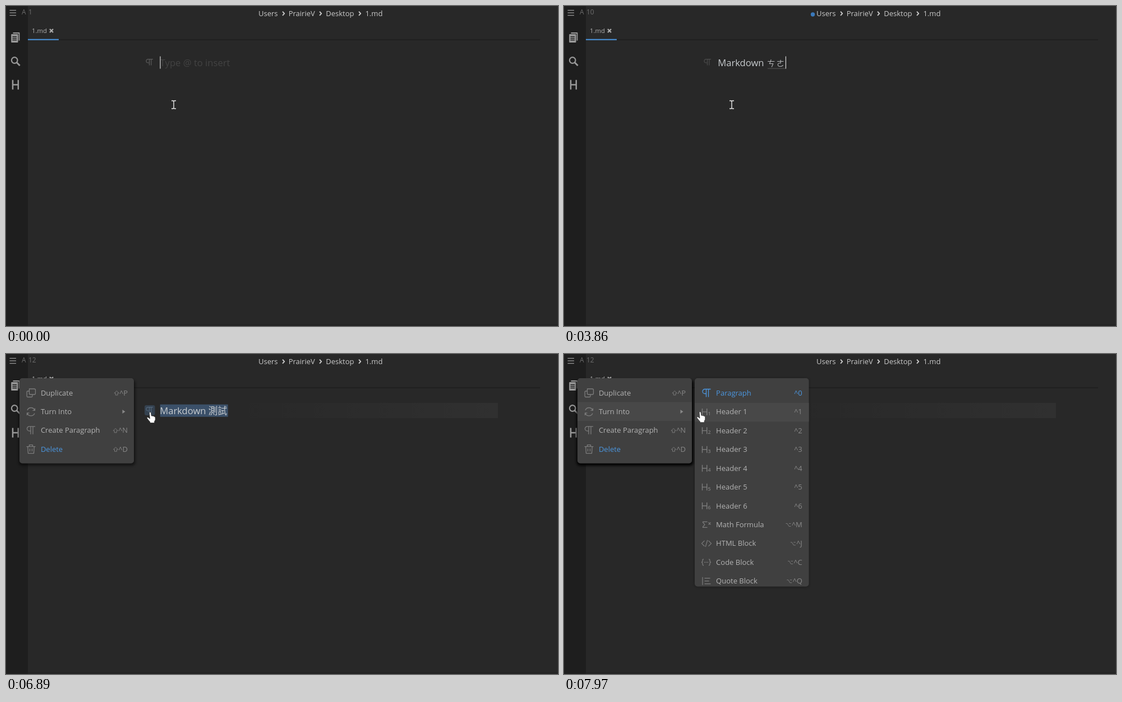
An HTML page that plays this animation: 984x569 px, repeating every 8 s.

```html
<!DOCTYPE html>
<html lang="zh-Hant">
<head>
<meta charset="utf-8">
<style>
html, body { margin: 0; width: 100%; height: 100%; overflow: hidden; background: #282828; }
svg { display: block; width: 984px; height: 569px; }
text { font-family: "Open Sans", "Noto Sans CJK TC", "Noto Sans CJK", sans-serif; font-size: 13px; white-space: pre; }
.line { fill: none; stroke-linecap: butt; stroke-linejoin: round; }
#body { font-size: 16.600px; }
#phonetic { font-size: 14px; letter-spacing: 2.500px; }
</style>
</head>
<body>
<svg viewBox="0 0 984 569" xmlns="http://www.w3.org/2000/svg">
  <defs>
    <linearGradient id="fade">
      <stop offset=".25" stop-color="#fff" stop-opacity="0"/>
      <stop offset="1" stop-color="#fff" stop-opacity=".038"/>
    </linearGradient>
    <clipPath id="subClip"><rect x="233" y="43" width="203.500" height="370.500" rx="5"/></clipPath>
    <filter id="blur" x="-10%" y="-10%" width="120%" height="120%"><feGaussianBlur stdDeviation="2"/></filter>
    <g id="para" class="line" stroke-width="1.200">
      <path d="M13 .6H4.200a3.200 3.200 0 0 0 0 6.400H6.500M6.500 .6V11.500M9.800 .6V11.500"/>
    </g>
  </defs>
  <rect width="984" height="569" fill="#282828"/>
  <rect width="39" height="569" fill="#1e1e1e"/>
  <path d="M39 567.500H984" stroke="#232323" stroke-width="2"/>
  <path d="M94 60H952" stroke="#202020" stroke-width="2"/>
  <rect x="39" y="58.700" width="55" height="2" fill="#4b95de"/>
  <g class="line" stroke="#999">
    <path d="M12.500 48H23.500V61.500" stroke-width="1.800"/>
    <rect x="9.200" y="50" width="12.300" height="15" rx="1" fill="#999" stroke="none"/>
    <path d="M11.500 54.500H19M11.500 57.500H19M11.500 60.500H19" stroke="#1e1e1e" stroke-width="1.300"/>
    <path d="M6.500 7.700H18M6.500 12.200H18M6.500 16.700H18" stroke-width="1.300"/>
    <circle cx="15.200" cy="96.500" r="5.300" stroke-width="2.200"/>
    <path d="M19.200 100.500L24.700 106" stroke-width="2.800"/>
    <path d="M12 131.500V148.500M21.800 131.500V148.500M12 140H21.800" stroke-width="2.500"/>
  </g>
  <g fill="#6c6c6c"><text x="28" y="15" style="font-size:12px">A</text><text id="count" x="40" y="15" style="font-size:12px"></text></g>
  <circle id="dot" cx="443.500" cy="15" r="3.700" fill="#3a79bb"/>
  <g fill="#cacaca">
    <text x="450" y="18">Users</text><text x="503.700" y="18">PrairieV</text>
    <text x="570.300" y="18">Desktop</text><text x="640.400" y="18">1.md</text>
  </g>
  <path id="chevrons" class="line" stroke="#cacaca" stroke-width="1.900"/>
  <text x="46" y="48" fill="#acacac" style="font-size:11.300px">1.md</text>
  <path d="M78 41L84 47M84 41L78 47" stroke="#acacac" stroke-width="2.300"/>

  <rect id="row" x="247" y="87" width="630" height="27" fill="url(#fade)"/>
  <rect id="hover" x="247" y="91" width="18.500" height="18" rx="3" fill="#34414f"/>
  <use id="mark" href="#para" x="249" y="94"/>
  <rect id="select" x="274.700" y="89.700" width="121" height="22" fill="#3b5069"/>
  <text id="hint" x="274.700" y="107" fill="#434343" style="font-size:16.600px">Type @ to insert</text>
  <text id="body" x="274.200" y="107" fill="#c6cacd"><tspan id="typed"></tspan><tspan id="phonetic" dx="1.500" fill="#b4b6b8"></tspan></text>
  <rect id="under" x="363" y="110.600" height="1" fill="#565656"/>
  <rect id="caret" y="89.500" width="1.200" height="22" fill="#d8d8d8"/>

  <g id="menu">
    <rect id="shade" x="22.500" y="46" width="208" height="152.500" rx="6" fill="#000" filter="url(#blur)"/>
    <rect x="24" y="43" width="204" height="151.500" rx="5" fill="#404040"/>
    <rect id="turn" x="24" y="85.500" width="204" height="33.500" fill="#484848"/>
    <g id="menuItems"></g>
  </g>
  <g id="sub">
    <rect x="232.500" y="43.500" width="204.500" height="371" rx="6" fill="#000" opacity=".3" filter="url(#blur)"/>
    <g clip-path="url(#subClip)">
      <rect x="233" y="43" width="204" height="371" fill="#404040"/>
      <rect id="head" x="233" y="87" width="204" height="33.300" fill="#484848"/>
      <g id="subItems"></g>
    </g>
  </g>

  <g id="beam" class="line"><path d="M-4 -7H-1L0 -6L1 -7H4M-4 7H-1L0 6L1 7H4M0 -6V6" stroke="#ececec" stroke-width="1.400"/></g>
  <path id="hand" fill="#fff" stroke="#222" stroke-width=".7" stroke-linejoin="round"
    d="M-1.500 1.200C-1.500 -.5 1.300 -.5 1.500 1.200L2.300 6.800C3 5.900 4.500 6.100 4.800 7.200C5.600 6.500 7 6.900 7.200 8C8.200 7.600 9 8.200 9.100 9.400L9.200 13.500L7.600 16.500V19H-.2V17.300C-2 15.500 -3.800 13 -5.600 10.700C-6.300 9 -4.300 8.500 -3 9.600L-.6 11.500Z"/>
</svg>
<script>
const $ = id => document.getElementById(id);
const show = (id, on) => $(id).style.display = on ? "" : "none";
const label = (x, y, s, fill, more = "") => `<text x="${x}" y="${y}" fill="${fill}" ${more}>${s}</text>`;
const line = (x, y, d, color, w = 1.2) =>
  `<path class="line" transform="translate(${x} ${y})" d="${d}" stroke="${color}" stroke-width="${w}"/>`;

const BLUE = "#4b96df", TEXT = "#b2b2b2", DIM = "#888", ICON = "#7c7c7c";
const shift = "M5 -4L9 0H7V3.500H3V0H1Z";
const option = "M1 -2.500H3.500L6.500 2.500H10M6.500 -2.500H10";

$("chevrons").setAttribute("d", [493, 559, 629].map(x => `M${x} 9.800L${x + 3.2} 13.300L${x} 16.800`).join(""));

function key(right, y, s, mod, width) {
  const x = right - width - (mod === shift ? 10 : 11.5);
  return label(right, y + 4.5, s, DIM, 'text-anchor="end"') + (mod ? line(x, y + .5, mod, "#808080", .9) : "");
}

const menuIcons = [
  "M5 -7H14Q16 -7 16 -5V1Q16 3 14 3H7Q5 3 5 1ZM5 -3H2Q.7 -3 .7 -1.500V6Q.7 7.500 2 7.500H9Q10.500 7.500 10.500 6V3",
  "M1.500 -2.500A7 7 0 0 1 14.500 -2.500M14.500 3A7 7 0 0 1 1.500 3M15 -6V-2H11M1 6.500V2.500H5",
  "M15.500 -7H5a4 4 0 0 0 0 8H7.500M7.500 -7V7M11.500 -7V7",
  "M0 -4.500H16M5 -4.500V-7.500H11V-4.500M2.200 -4.500L3 7.500H13L13.800 -4.500M6 -1V4M10 -1V4"
];
const menuRows = [["Duplicate", "^P", 14.8], ["Turn Into"], ["Create Paragraph", "^N", 16.8], ["Delete", "^D", 16.5]];
$("menuItems").innerHTML = menuRows.map(([name, k, w], i) => {
  const y = 69 + i * 33.4;
  return line(36.5, y, menuIcons[i], ICON, 1.3) + label(61.9, y + 4.5, name, i === 3 ? BLUE : TEXT) +
    (k ? key(217, y, k, shift, w) : `<path d="M207.500 ${y - 3.5}V${y + 3.5}L212.500 ${y}Z" fill="${DIM}"/>`);
}).join("");

const blockIcons = [
  "M10 -5H2V-4L5.500 0L2 4V5H10M12 -4L16 0M16 -4L12 0",
  "M5 -5L0 0L5 5M12 -5L17 0L12 5M10.300 -6L6.700 6",
  "M3.500 -5.500Q1.500 -5.500 1.500 -3.500V-1.500L0 0L1.500 1.500V3.500Q1.500 5.500 3.500 5.500M12.500 -5.500Q14.500 -5.500 14.500 -3.500V-1.500L16 0L14.500 1.500V3.500Q14.500 5.500 12.500 5.500M4.500 0H6.200M7.200 0H8.900M9.900 0H11.600",
  "M1.500 -7V7M5 -5H15M5 0H13M5 5H16"
];
const blocks = [["Math Formula", "^M", 18.8], ["HTML Block", "^J", 10.5], ["Code Block", "^C", 15.2], ["Quote Block", "^Q", 17]];
const subRows = [["Paragraph", "^0"], ...[1, 2, 3, 4, 5, 6].map(n => ["Header " + n, "^" + n]), ...blocks];
$("subItems").innerHTML = subRows.map(([name, k, w], i) => {
  const y = 69.5 + i * 33.42;
  let icon;
  if (!i) icon = line(246, y, menuIcons[2], BLUE, 1.3);
  else if (i < 7) icon = line(246, y, "M.5 -6V6M8.700 -6V6M.5 0H8.700", ICON, 1.4) +
    label(256.5, y + 6, i, ICON, 'style="font-size:9px;font-weight:600"');
  else icon = line(245.5, y, blockIcons[i - 7], ICON);
  const keys = i ? key(424.8, y, k, w && option, w) : label(424.8, y + 4.5, k, BLUE, 'text-anchor="end"');
  return icon + label(271.1, y + 4.5, name, i ? TEXT : BLUE) + keys;
}).join("");

// Latest entry [time, ...values] that has begun.
const held = (keys, t) => keys.reduce((a, k) => t >= k[0] ? k : a);
const between = (t, a, b) => t >= a && t < b;

// time, text, caret x, composing width, phonetic tail
const typing = [
  [0, "", 274.4], [1300, "M", 289.4], [1530, "Ma", 298.2], [2060, "Mar", 305], [2230, "Mark", 313.8],
  [2840, "Markd", 324], [2920, "Markdo", 334], [3070, "Markdow", 346.8], [3240, "Markdown", 357],
  [3560, "Markdown ", 361.2], [3860, "Markdown ", 394.8, 32, "ㄘㄜ"], [4490, "Markdown 測", 378.3, 16],
  [4560, "Markdown 測", 394.8, 32, "ㄕ"], [4710, "Markdown 測試", 394.8, 32], [4790, "Markdown 測試", 394.8]
];
const caretOff = [[290, 820], [2780, 2840], [4410, 4490], [5340, 9000]];
const pointer = [
  [0, 299, 175.5], [5420, 311, 166], [5490, 329, 151], [5570, 343, 140], [5650, 344, 134], [5720, 334, 129],
  [5800, 318, 124], [5870, 301, 120], [5950, 286, 117], [6020, 275, 116], [6100, 267, 115],
  [6180, 258, 104.5], [6250, 257, 103.5], [7270, 215, 103], [7350, 200.6, 102.7], [7900, 224, 102.7], [7970, 242.6, 102.7]
];
// time, scale, opacity
const menuIn = [[0, 1, 0], [6730, .78, .25], [6800, .9, .7], [6890, 1, 1]];
const subIn = [[0, 1, 0], [7420, .78, .35], [7500, .855, .8], [7580, 1, 1]];

function pop(id, keys, t, x, y) {
  const [, s, o] = held(keys, t);
  show(id, o > 0);
  $(id).setAttribute("opacity", o);
  $(id).setAttribute("transform", `translate(${x} ${y}) scale(${s}) translate(${-x} ${-y})`);
}

function draw(t) {
  const [, text, caretX, width = 0, tail = ""] = held(typing, t);
  $("count").textContent = t < 3860 ? text.length + 1 : t < 4790 ? 10 : 12;
  $("typed").textContent = text;
  $("phonetic").textContent = tail;
  show("hint", !text);
  show("under", width);
  $("under").setAttribute("width", width);
  $("caret").setAttribute("x", caretX);
  show("caret", !caretOff.some(([a, b]) => between(t, a, b)));
  show("dot", between(t, 1300, 4560) || between(t, 4790, 5720));

  const picked = t >= 6650, over = between(t, 6180, 7270);
  show("select", picked);
  show("row", picked);
  show("hover", over);
  $("hover").setAttribute("opacity", t < 6250 ? .6 : 1);
  $("mark").setAttribute("stroke", over ? "#53677c" : text ? "#4c4c4c" : "#5c5c5c");

  pop("menu", menuIn, t, 228, 119);
  $("shade").setAttribute("opacity", held([[0, .5], [6960, .75], [7040, .95]], t)[1]);
  show("turn", t >= 7350);
  pop("sub", subIn, t, 233, 228.3);
  show("head", t >= 7970);

  const [, x, y] = held(pointer, t), hand = t >= 6180;
  show("beam", !hand);
  show("hand", hand);
  $(hand ? "hand" : "beam").setAttribute("transform", `translate(${x} ${y})`);
}

const start = performance.now();
function tick() {
  draw((performance.now() - start) % 8000);
  requestAnimationFrame(tick);
}
draw(0);
requestAnimationFrame(tick);
</script>
</body>
</html>
```
